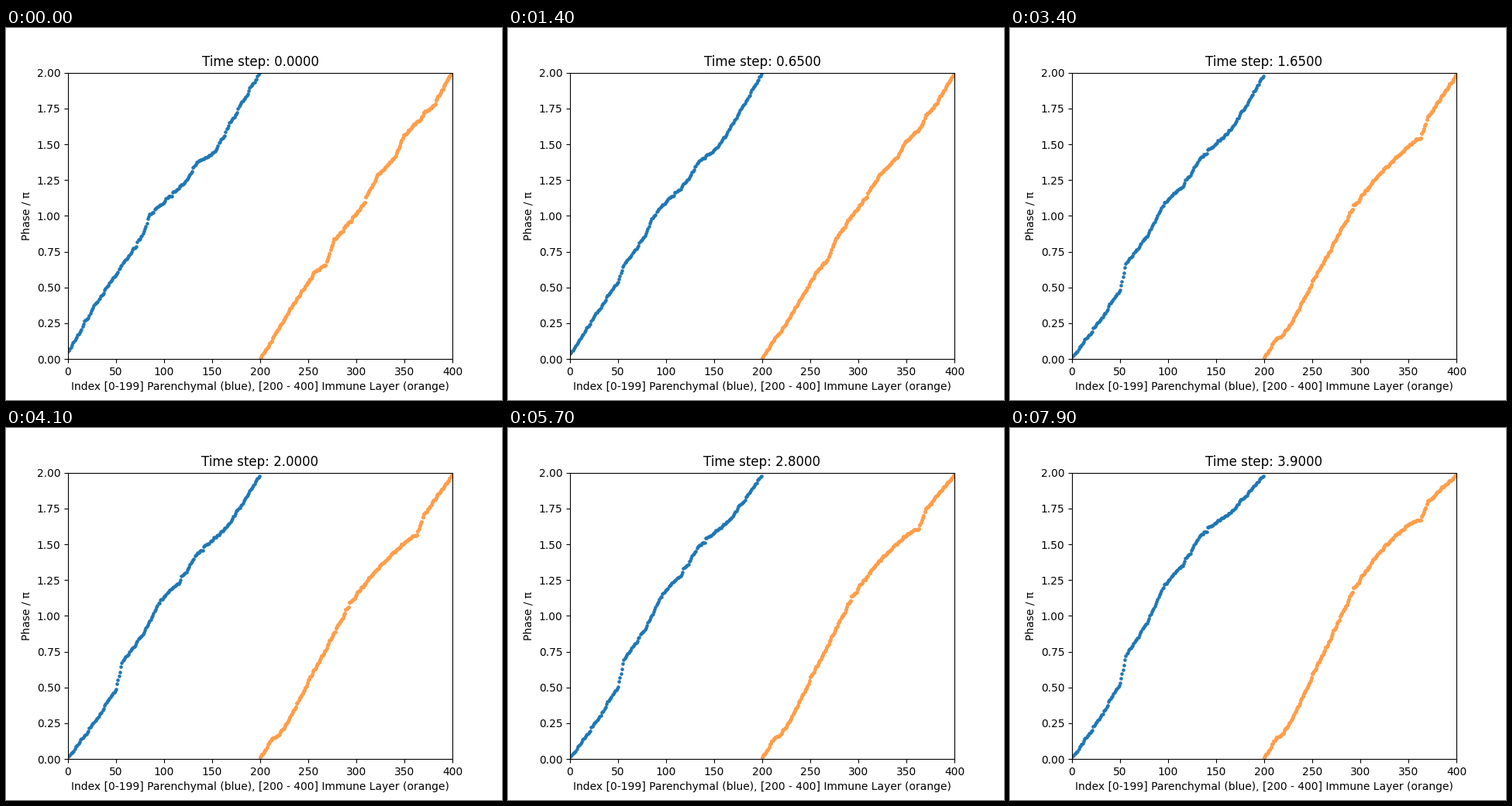
Write a matplotlib script that moves like this. It is 640x480 px and loops after 8000 ms.

```python
import numpy as np
import matplotlib.pyplot as plt
from matplotlib.animation import FuncAnimation

COUNT = 200
FRAMES = 80
DT = 0.05
SETTLE = 1.4  # time at which the initial phases have been forgotten
INDEX = np.arange(COUNT)


def ripple(rng):
    """Local unevenness of sorted random phases."""
    walk = np.cumsum(0.006 * (rng.exponential(size=COUNT) - 1))
    padded = np.pad(walk, 5, mode="edge")
    return walk - np.convolve(padded, np.ones(11) / 11, "valid")


def smoothstep(u):
    u = np.clip(u, 0, 1)
    return u * u * (3 - 2 * u)


class Layer:
    """Sorted phases: random start, settled shape, then a slow upward drift."""

    def __init__(self, ax, offset, start, settled, seed, **style):
        rng = np.random.default_rng(seed)
        self.start = np.interp(INDEX, *zip(*start)) + ripple(rng)
        self.settled = np.interp(INDEX, *zip(*settled)) + ripple(rng)
        self.drift = 0.07 * np.sin(np.pi * (INDEX / (COUNT - 1)) ** 1.7)
        self.dots, = ax.plot(INDEX + offset, self.phases(0), "o", mew=0, **style)

    def phases(self, t):
        w = smoothstep(t / SETTLE)
        shape = self.start * (1 - w) + self.settled * w
        shape = shape + self.drift * max(t - SETTLE, 0)
        return np.sort(np.clip(shape, 0, 2))

    def show(self, t):
        self.dots.set_ydata(self.phases(t))


fig, ax = plt.subplots(figsize=(6.4, 4.8), dpi=100)
ax.set_xlim(0, 400)
ax.set_ylim(0, 2)
ax.set_xlabel("Index [0-199] Parenchymal (blue), [200 - 400] Immune Layer (orange)")
ax.set_ylabel("Phase / π")
title = ax.set_title("")

layers = [
    Layer(ax, 0,
          start=[(0, 0.05), (28, 0.38), (78, 0.87), (85, 1.01), (121, 1.23),
                 (134, 1.37), (153, 1.45), (168, 1.64), (199, 2.0)],
          settled=[(0, 0.01), (28, 0.26), (50, 0.48), (56, 0.66), (78, 0.85),
                   (87, 0.96), (94, 1.06), (117, 1.21), (134, 1.39),
                   (164, 1.58), (181, 1.76), (199, 1.98)],
          seed=2, ms=3.3, color="#1f77b4"),
    Layer(ax, COUNT,
          start=[(0, 0.0), (34, 0.38), (58, 0.62), (68, 0.66), (76, 0.82),
                 (104, 1.05), (122, 1.28), (141, 1.42), (149, 1.56),
                 (181, 1.78), (199, 2.0)],
          settled=[(0, 0.01), (10, 0.12), (25, 0.21), (50, 0.53), (74, 0.82),
                   (91, 1.03), (104, 1.15), (122, 1.29), (148, 1.46),
                   (164, 1.55), (169, 1.66), (199, 1.98)],
          seed=5, ms=3.7, color="#ff9e4a"),
]


def update(i):
    t = max(i - 1, 0) * DT
    for layer in layers:
        layer.show(t)
    title.set_text(f"Time step: {t:.4f}")
    return [layer.dots for layer in layers] + [title]


anim = FuncAnimation(fig, update, frames=FRAMES, interval=100,
                     repeat=True, repeat_delay=0, blit=False)
plt.show()
```
